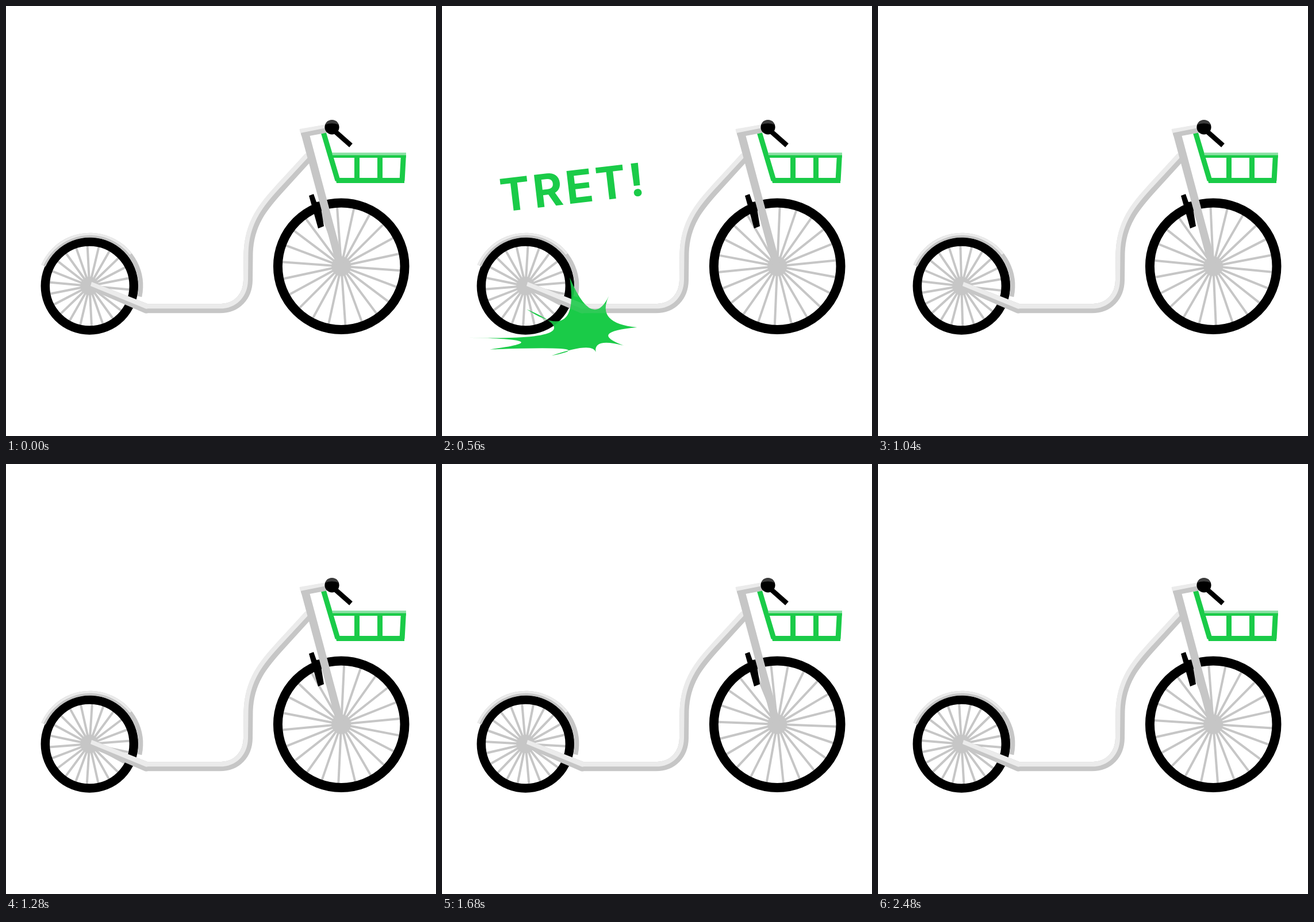
Write an HTML page with a canvas that moves like this. It is 748 by 748 pixels and loops after 2.52 s.

```html
<!DOCTYPE html>
<html lang="de">
<head>
<meta charset="utf-8">
<title>Tretroller</title>
<style>
html, body { margin: 0; width: 100%; height: 100%; overflow: hidden; background: #fff; }
canvas { display: block; }
</style>
</head>
<body>
<canvas id="stage" width="748" height="748"></canvas>
<script>
const ctx = document.getElementById('stage').getContext('2d');
const LOOP = 2520, STEP = 40, SPOKES = 22;
const GRAY = '#c6c6c6', LIGHT = '#ebebeb', GREEN = '#1acb48', MINT = '#8ee0a6';

// Wheel angle in degrees over time: a kick, then coasting to rest after one turn.
const spin = [[0, 0], [320, 67.6], [800, 171.7], [1280, 252.2], [1680, 308.9],
              [2080, 343.6], [2480, 359.6], [2520, 360]];

// Each row: spike tip, then the middle of the hollow leading to the next tip.
const spikes = [
  [40, 577, 187, 568], [146, 527, 212, 544], [222, 471, 259, 526],
  [291, 504, 292, 542], [341, 559, 291, 571], [317, 591, 278, 587],
  [268, 603, 246, 595], [190, 609, 210, 597], [81, 598, 135, 584]
];

const clamp = x => Math.max(0, Math.min(1, x));
const ramp = (t, from, to) => clamp((t - from) / (to - from));

function fill(path, color) {
  ctx.fillStyle = color;
  ctx.fill(new Path2D(path));
}

function stroke(path, color, width) {
  ctx.strokeStyle = color;
  ctx.lineWidth = width;
  ctx.stroke(new Path2D(path));
}

function arc(x, y, r, color, width, from = 0, to = 360) {
  ctx.beginPath();
  ctx.arc(x, y, r, from * Math.PI / 180, to * Math.PI / 180);
  ctx.strokeStyle = ctx.fillStyle = color;
  ctx.lineWidth = width;
  width ? ctx.stroke() : ctx.fill();
}

// Cubic Hermite interpolation through the spin keys.
function wheelAngle(t) {
  const i = Math.max(0, spin.findIndex(k => k[0] > t) - 1);
  const slope = j => {
    const a = spin[Math.max(0, j - 1)], b = spin[Math.min(spin.length - 1, j + 1)];
    return (b[1] - a[1]) / (b[0] - a[0]);
  };
  const [t0, a0] = spin[i], [t1, a1] = spin[i + 1];
  const d = t1 - t0, u = (t - t0) / d, v = 1 - u;
  return a0 * v * v * (1 + 2 * u) + a1 * u * u * (3 - 2 * u)
       + d * u * v * (slope(i) * v - slope(i + 1) * u);
}

function wheel(x, y, r, tire, hub, degrees) {
  for (let i = 0; i < SPOKES; i++) {
    const a = (degrees - 90) * Math.PI / 180 + i * 2 * Math.PI / SPOKES;
    stroke(`M${x} ${y}L${x + r * Math.cos(a)} ${y + r * Math.sin(a)}`, GRAY, 4);
  }
  arc(x, y, hub, GRAY);
  arc(x, y, r, '#000', tire);
}

function scooter(angle) {
  wheel(145.3, 487, 77, 15.5, 16, angle - 3);
  wheel(583.2, 452.7, 110.3, 16, 17, angle - 4);

  // Rear fender
  arc(146, 487, 88.3, GRAY, 8, 203.6, 372);
  arc(146, 487, 90.2, LIGHT, 4, 203.6, 322);

  // Frame
  fill('M149 480L246 518V534.5H242L144 492Z', GRAY);
  stroke('M243 526.3H372C402 526.3 420.5 505 421 477L421.5 430C423 375 452 345 478 316L527 262', GRAY, 16);
  fill('M149 480L246 518V526.5H243L147 487Z', LIGHT);
  stroke('M243 522.3H372C399 522.3 416.5 503 417 477L417.5 430C418.5 373 448 342 475 312L524 259', LIGHT, 8);

  // Brake and fork
  fill('M527 330L535 327L540 341L546 340L553 383L543 387L534 355Z', '#000');
  fill('M512 218L528 224L589 452H575Z', GRAY);

  // Basket
  stroke('M552.5 221L577 303.5M610.5 260V304M650.5 260V304M691.5 258L689 304', GREEN, 9);
  fill('M573 299H693V308H575Z', GREEN);
  fill('M566 255H696L695.5 264H568Z', GREEN);
  fill('M567 255H696V259.5H568Z', MINT);

  // Stem, lever and grip
  fill('M511 215L558 206L560 220L528 226H514Z', GRAY);
  fill('M510.5 214L557 206V212L512 221Z', LIGHT);
  stroke('M570 216L600 242.5', '#000', 8.5);
  arc(567, 210.8, 12.6, '#000');
  fill('M555.2 206.5A12.6 12.6 0 0 1 578.8 206.5Q567 202 555.2 206.5Z', '#3c3c3c');
}

function burst(scale) {
  ctx.save();
  ctx.translate(230, 560);
  ctx.scale(scale, scale);
  ctx.translate(-230, -560);
  ctx.beginPath();
  ctx.moveTo(spikes[0][0], spikes[0][1]);
  spikes.forEach(([x, y, hx, hy], i) => {
    const [nx, ny] = spikes[(i + 1) % spikes.length];
    ctx.quadraticCurveTo(2 * hx - (x + nx) / 2, 2 * hy - (y + ny) / 2, nx, ny);
  });
  ctx.fillStyle = GREEN;
  ctx.fill();
  ctx.restore();
}

function shout() {
  ctx.save();
  ctx.translate(104.2, 358.2);
  ctx.rotate(-6.7 * Math.PI / 180);
  ctx.font = '700 79px Inter, sans-serif';
  ctx.letterSpacing = '5px';
  ctx.fillStyle = GREEN;
  ctx.fillText('TRET!', 0, 0);
  ctx.restore();
}

function draw(t) {
  const fadeIn = ramp(t, 120, 280);
  const alpha = fadeIn * (1 - ramp(t, 520, 860));
  const scale = 0.85 + 0.15 * fadeIn - 0.125 * ramp(t, 520, 860);

  ctx.clearRect(0, 0, 748, 748);
  scooter(wheelAngle(t));
  if (!alpha) return;

  // The burst blends over the scooter, but is all or nothing on the empty ground.
  ctx.save();
  ctx.globalCompositeOperation = 'source-atop';
  ctx.globalAlpha = alpha;
  burst(scale);
  ctx.restore();
  if (alpha >= 0.5) {
    ctx.save();
    ctx.globalCompositeOperation = 'destination-over';
    burst(scale);
    shout();
    ctx.restore();
  }
}

const start = performance.now();
function tick() {
  const t = (performance.now() - start) % LOOP;
  draw(Math.floor(t / STEP) * STEP);
  requestAnimationFrame(tick);
}
tick();
</script>
</body>
</html>
```
